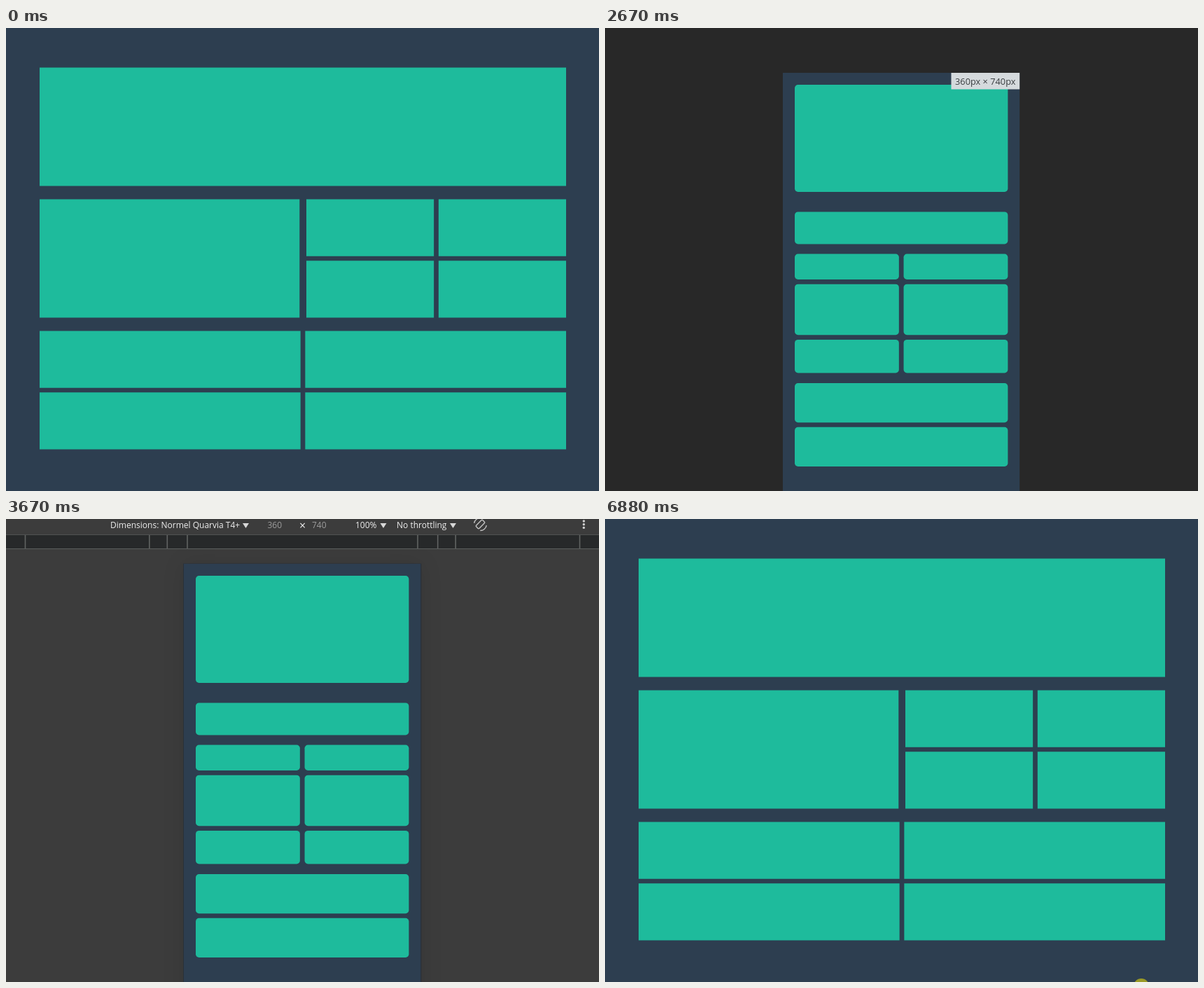
An HTML page with a canvas for the animation above (6950 ms loop, 847 by 661 pixels).

```html
<!DOCTYPE html>
<html lang="en">
<head>
<meta charset="utf-8">
<title>Responsive grid</title>
<style>
html, body { margin: 0; width: 100%; height: 100%; overflow: hidden; background: #2d3e50; }
canvas { display: block; }
</style>
</head>
<body>
<canvas id="stage" width="847" height="661"></canvas>
<script>
const ctx = document.getElementById('stage').getContext('2d');
const W = 847, H = 661, MID = 423.5, LOOP = 6950;
const NAVY = '#2d3e50', GREEN = '#1ebb9c', LIGHT = '#eeeeee', DIM = '#9c9c9c';
const FONT = '"Open Sans", "Noto Sans", sans-serif';

// Pointer sweeps, each a line that may bow upwards
const sweeps = [
  { from: 520, to: 850, steps: 5, a: [796, 652], b: [509, 342], bow: 0 },
  { from: 1070, to: 1210, steps: 2, a: [499, 338], b: [339, 254], bow: 0 },
  { from: 5800, to: 6480, steps: 10, a: [49, 235], b: [748, 655], bow: -45 },
  { from: 6880, to: LOOP, steps: 1, a: [766, 667], b: [766, 667], bow: 0 }
];

const lerp = (a, b, u) => a + (b - a) * u;
const smooth = u => u * u * (3 - 2 * u);

function rect(color, x, y, w, h) {
  ctx.fillStyle = color;
  ctx.fillRect(x, y, w, h);
}

function disc(color, x, y, r) {
  ctx.fillStyle = color;
  ctx.beginPath();
  ctx.arc(x, y, r, 0, 7);
  ctx.fill();
}

function text(str, x, y, color, size = 12) {
  ctx.font = `${size}px ${FONT}`;
  ctx.fillStyle = color;
  ctx.fillText(str, x, y);
}

// Fills a box with equal cells
function grid(x, y, w, h, cols = 1, rows = 1, radius = 0, gap = 6.7) {
  const cw = (w - gap * (cols - 1)) / cols, ch = (h - gap * (rows - 1)) / rows;
  ctx.fillStyle = GREEN;
  for (let i = 0; i < cols * rows; i++) {
    const col = i % cols, row = (i - col) / cols;
    ctx.beginPath();
    ctx.roundRect(x + col * (cw + gap), y + row * (ch + gap), cw, ch, radius);
    ctx.fill();
  }
}

function sizeLabel(str, x, y) {
  rect('#d5dadd', x, y, 97.7, 23.5);
  text(str, x + 5.5, y + 17, '#3a3e41', 12.8);
}

function caret(x) {
  ctx.fillStyle = '#d8d8d8';
  ctx.beginPath();
  ctx.moveTo(x - 4.5, 6);
  ctx.lineTo(x + 4.5, 6);
  ctx.lineTo(x, 13);
  ctx.fill();
}

function rotateIcon(x, y) {
  ctx.save();
  ctx.translate(x, y);
  ctx.rotate(Math.PI / 4);
  ctx.strokeStyle = '#c4c4c4';
  ctx.lineWidth = 1.4;
  ctx.beginPath();
  ctx.roundRect(-3, -6.5, 6, 13, 1.5);
  for (const a of [-0.6, Math.PI - 0.6]) {
    ctx.moveTo(9 * Math.cos(a), 9 * Math.sin(a));
    ctx.arc(0, 0, 9, a, a + 1.4);
  }
  ctx.stroke();
  ctx.restore();
}

function toolbar() {
  rect('#505252', 0, 22, W, 1);
  rect('#27292a', 0, 23, W, 19);
  rect('#5b5e5d', 0, 42, W, 1);
  for (const d of [164.5, 193.2, 218.7, 396])
    for (const x of [MID - d, MID + d]) rect('#606362', x - 0.8, 23, 1.6, 19);
  text('Dimensions: Normel Quarvia T4+', 149, 13, LIGHT);
  text('360', 373.5, 13, DIM);
  text('×', 419, 14.5, LIGHT, 16);
  text('740', 437, 13, DIM);
  text('100%', 499, 13, LIGHT);
  text('No throttling', 558, 13, LIGHT);
  [342.5, 539, 638.5].forEach(caret);
  rotateIcon(677.5, 7.5);
  for (let i = 0; i < 3; i++) disc('#d0d0d0', 825.3, 3 + i * 4.7, 1.7);
}

function desktop(t) {
  rect(NAVY, 0, 0, W, H);
  const top = 56.4, h = 169.2, pitch = 188;
  grid(48, top, 752, h);
  grid(48, top + pitch, 371.3, h);
  grid(429, top + pitch, 371, h, 2, 2);
  grid(48, top + 2 * pitch, 752, h, 2, 2);
  if (t >= 5000 && t < 5660) sizeLabel('903px × 711px', 750.3, -6);
}

function phone(t) {
  const tools = t >= 2750, x = 271, w = 304.4, r = 4.7;
  rect(tools ? '#3c3c3c' : '#282828', 0, 0, W, H);
  if (tools) {
    ctx.save();
    ctx.shadowColor = 'rgba(0,0,0,.1)';
    ctx.shadowBlur = 30;
    rect('#2a3038', 253, 63.5, 340.3, 700);
    ctx.restore();
    toolbar();
  }
  rect(NAVY, 254, 64, 338.2, 597);
  grid(x, 81, w, 153, 1, 1, r);
  grid(x, 262.4, w, 46, 1, 1, r);
  let y = 322.5;
  for (const h of [36.5, 72.5, 47.5]) {
    grid(x, y, w, h, 2, 1, r);
    y += h + 6.7;
  }
  grid(x, 507, w, 119, 1, 2, r);
  if (t < 3670) sizeLabel('360px × 740px', 494.5, 64);
}

function pointer(t) {
  const s = sweeps.find(s => t >= s.from && t < s.to);
  if (!s) return;
  const step = Math.floor((t - s.from) / (s.to - s.from) * s.steps);
  const u = smooth(step / Math.max(1, s.steps - 1));
  const bow = s.bow * Math.sin(Math.PI * u);
  disc('rgba(255,240,0,.52)', lerp(s.a[0], s.b[0], u), lerp(s.a[1], s.b[1], u) + bow, 11);
}

const start = performance.now();
function tick() {
  const t = (performance.now() - start) % LOOP;
  (t >= 2670 && t < 5000 ? phone : desktop)(t);
  pointer(t);
  requestAnimationFrame(tick);
}
tick();
</script>
</body>
</html>
```
